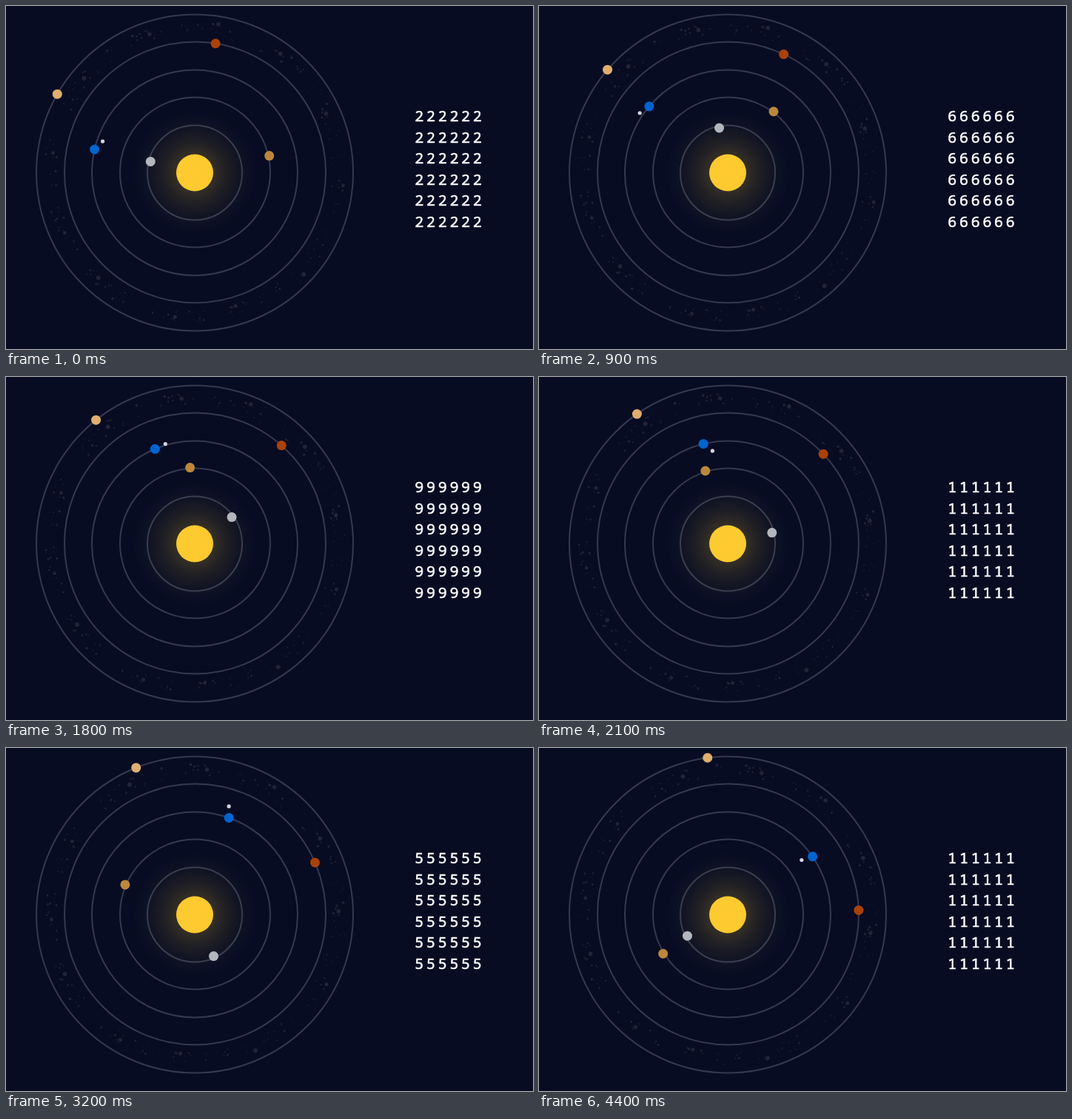
An HTML page that plays this animation: 712x464 px, repeating every 4500 ms.

```html
<!DOCTYPE html>
<html lang="en">
<head>
<meta charset="utf-8">
<title>Orbits</title>
<style>
  html, body { margin: 0; width: 100%; height: 100%; overflow: hidden; background: #070c23; }
  svg { display: block; }
  .orbit { fill: none; stroke: #343950; stroke-width: 2; }
  .digits {
    font: 20px "Noto Sans Mono", "DejaVu Sans Mono", monospace;
    letter-spacing: 3.7px; fill: #fff; stroke: #fff; stroke-width: .55;
  }
</style>
</head>
<body>
<svg id="stage" width="712" height="464" viewBox="0 0 712 464">
  <defs>
    <radialGradient id="glow">
      <stop offset=".28" stop-color="#ffca2f" stop-opacity=".19"/>
      <stop offset=".5" stop-color="#ffca2f" stop-opacity=".1"/>
      <stop offset=".75" stop-color="#ffca2f" stop-opacity=".035"/>
      <stop offset="1" stop-color="#ffca2f" stop-opacity="0"/>
    </radialGradient>
  </defs>
  <g id="belt" fill="#8c8983"></g>
  <g id="orbits"></g>
  <circle cx="255" cy="225.5" r="84" fill="url(#glow)"/>
  <circle cx="255" cy="225.5" r="25" fill="#fdca2f"/>
  <g id="planets"></g>
  <g id="click">
    <circle cx="206" cy="252" r="29" fill="#0a0af5" fill-opacity=".88"/>
    <path d="M207 252v16.5l3.8-3.6 2.8 6.4 2.7-1.2-2.8-6.2h5.2z" fill="#fff" stroke="#000" stroke-width=".9"/>
  </g>
  <g id="digits" class="digits"></g>
</svg>
<script>
  const CX = 255, CY = 225.5, STEP = 100, STEPS = 45;
  const CLICK_STEP = 5, CLUMPS = 12;
  const $ = id => document.getElementById(id);

  function add(parent, tag, attrs) {
    const el = document.createElementNS("http://www.w3.org/2000/svg", tag);
    for (const key in attrs) el.setAttribute(key, attrs[key]);
    return parent.appendChild(el);
  }

  function polar([x, y], radius, degrees) {
    const a = degrees * Math.PI / 180;
    return [x + radius * Math.cos(a), y + radius * Math.sin(a)];
  }

  function place(el, [x, y]) {
    el.setAttribute("cx", x.toFixed(2));
    el.setAttribute("cy", y.toFixed(2));
  }

  let seed = 17;
  const random = () => (seed = seed * 16807 % 2147483647) / 2147483647;
  const between = (low, high) => low + (high - low) * random();

  function addRock(angle, r, opacity) {
    place(add($("belt"), "circle", { r, opacity }), polar([CX, CY], between(186, 204), angle));
  }

  // The belt is a ring of evenly spaced dust clumps, each with one larger rock
  for (let i = 0; i < CLUMPS; i++) {
    const middle = 5 + i * 360 / CLUMPS;
    addRock(middle + between(0, 9), between(2.3, 3), .2);
    for (let k = 0; k < 18; k++)
      addRock(middle + between(-12, 12), .6 + 1.2 * random() ** 2, between(.12, .22));
  }

  // Rings of odd width sit half a pixel off the sun's centre
  const rings = Array.from({ length: 5 }, (_, i) => ({
    centre: [CX + i % 2 / 2, CY - i % 2 / 2],
    radius: 64 + 37.5 * i
  }));
  for (const { centre, radius } of rings)
    place(add($("orbits"), "circle", { class: "orbit", r: radius }), centre);

  // Start angle in degrees, period in steps
  const planets = [
    { start: 194.2, period: 49.8, fill: "#b2b6bd", inset: 2.4 },
    { start: -12.6, period: -79.75, fill: "#bb883b", inset: -1.2 },
    { start: 193.1, period: 119.6, fill: "#0064d0" },
    { start: -81, period: 200, fill: "#aa4106" },
    { start: 209.8, period: 299.5, fill: "#dfae6f" }
  ];
  for (const p of planets)
    p.el = add($("planets"), "circle", { r: 6.5, fill: p.fill });
  const earth = planets[2];
  const moon = add($("planets"), "circle", { r: 2.6, fill: "#d2d5da" });

  const rows = Array.from({ length: 6 }, (_, i) =>
    add($("digits"), "text", { x: 552.3, y: Math.round(156.3 + i * 28.5) }));

  function draw(step) {
    planets.forEach((p, i) => {
      const { centre, radius } = rings[i];
      p.at = polar(centre, radius - (p.inset || 0), p.start + 360 * step / p.period);
      place(p.el, p.at);
    });
    place(moon, polar(earth.at, 15.5, -45 + 21.08 * step));
    $("belt").setAttribute("transform", `rotate(${.716 * step} ${CX} ${CY})`);
    $("click").setAttribute("visibility", step === CLICK_STEP ? "visible" : "hidden");
    const digit = Math.floor(2.15 + .43 * step) % 10;
    for (const row of rows) row.textContent = String(digit).repeat(6);
  }

  const origin = performance.now();
  function tick() {
    draw(Math.floor((performance.now() - origin) / STEP) % STEPS);
    requestAnimationFrame(tick);
  }
  tick();
</script>
</body>
</html>
```
